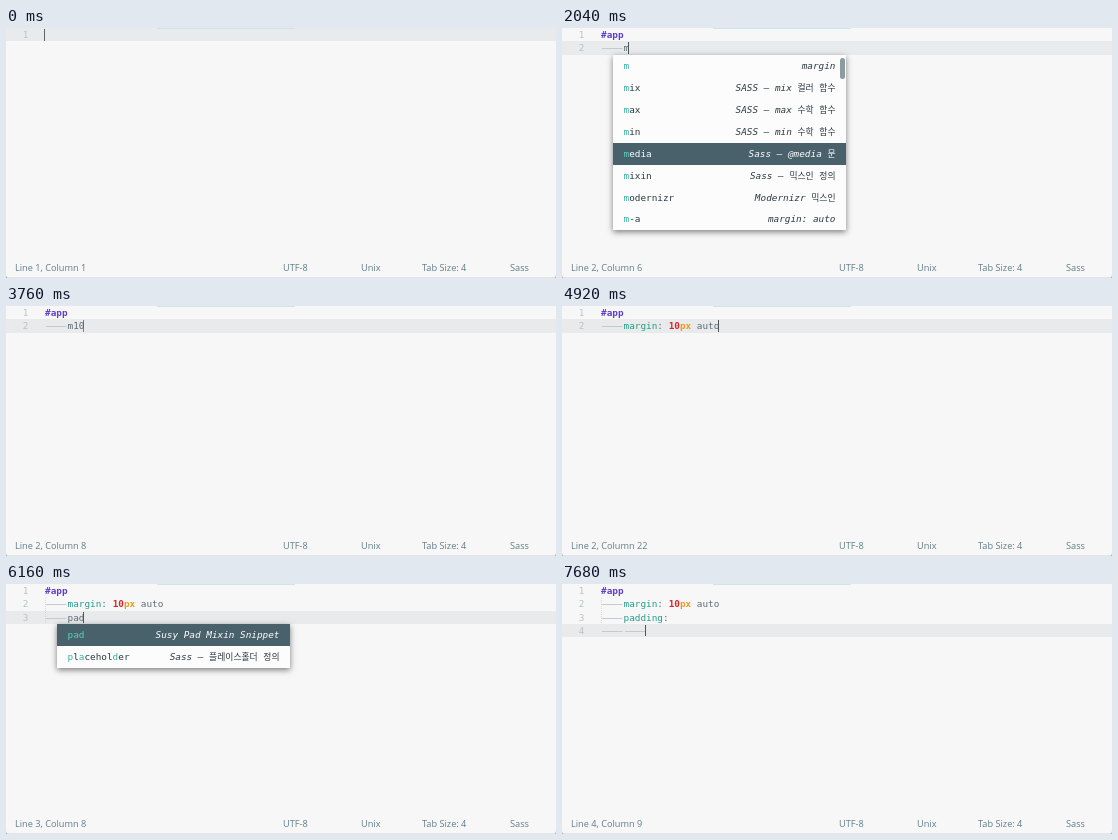
Recreate the animation shown at these times as an HTML page. Size 550 px wide and 250 px high, loop 8 s.

```html
<!DOCTYPE html>
<html lang="en">
<head>
<meta charset="utf-8">
<title>Sass editor</title>
<style>
  html, body { margin: 0; width: 100%; height: 100%; overflow: hidden; background: #9da2a4; }
  #stage {
    position: relative; width: 550px; height: 250px; overflow: hidden;
    background: #f7f7f7; border-radius: 0 0 3px 3px;
    box-shadow: inset 0 -1px #e3e5e6;
    font: 9.37px/13.33px "DejaVu Sans Mono", monospace; color: #5c6c76;
  }
  #stage div { position: absolute; white-space: pre; }
  #active { left: 0; width: 550px; height: 13.33px; background: #e8eaeb; }
  #tabline { left: 151px; top: 0; width: 138px; height: 1px; background: #cbe7e4; }
  #guide { left: 39px; top: 14px; width: 0; height: 25px; border-left: 1px dotted #d0d6d9; }
  #caret { width: 1px; height: 11.5px; background: #4c565b; }
  .num { left: 0; width: 22.5px; text-align: right; color: #bcc3c6; }
  .line { left: 39px; }
  .tab { background: linear-gradient(#c3cbce, #c3cbce) 1px 6px / 20.5px 1px no-repeat; }
  .id { color: #5f3dc9; font-weight: bold; }
  .prop { color: #1f9d89; }
  .val { color: #d5242c; font-weight: bold; }
  .unit { color: #ea9a1e; font-weight: bold; }
  .tag { color: #e2403c; }
  .status { top: 233px; font: 9.2px/13px "Open Sans", sans-serif; color: #5f7d88; }
  #popup {
    left: 51px; width: 233px; background: #fcfcfc; color: #2b3a40;
    box-shadow: 0 2px 6px rgba(0, 0, 0, .5);
  }
  .row { left: 0; width: 233px; height: 21.9px; line-height: 21.9px; }
  .row span { position: absolute; left: 10.5px; }
  .row i { position: absolute; right: 10.5px; }
  .row b { font-weight: normal; color: #35b3a0; }
  .row u {
    font: 8.8px/1 "Noto Sans CJK KR", "Noto Sans CJK", sans-serif; text-decoration: none;
  }
  .row.on { background: #49616b; color: #fff; }
  .row.on b { color: #58d0bd; }
  #bar { left: 227px; top: 3px; width: 5px; height: 21px; border-radius: 3px; background: #8b9ba2; }
</style>
</head>
<body>
<div id="stage">
  <div id="active"></div>
  <div id="tabline"></div>
  <div id="guide"></div>
  <div id="code"></div>
  <div id="caret"></div>
  <div id="pos" class="status" style="left:9px"></div>
  <div class="status" style="left:277px">UTF-8</div>
  <div class="status" style="left:355px">Unix</div>
  <div class="status" style="left:416px">Tab Size: 4</div>
  <div class="status" style="left:504px">Sass</div>
  <div id="popup"><div id="rows"></div><div id="bar"></div></div>
</div>
<script>
const LOOP = 8000, LINE = 13.33, ROW = 21.9, CHAR = 5.641, LEFT = 39;
const $ = id => document.getElementById(id);

const lists = {
  m: { on: 4, rows: [
    ['m', 'margin'], ['mix', 'SASS – mix 컬러 함수'], ['max', 'SASS – max 수학 함수'],
    ['min', 'SASS – min 수학 함수'], ['media', 'Sass – @media 문'],
    ['mixin', 'Sass – 믹스인 정의'], ['modernizr', 'Modernizr 믹스인'], ['m-a', 'margin: auto']] },
  p: { on: 0, rows: [
    ['p', 'padding'],
    ...['po Post', 'pr Pre', 'px Prefix', 'pl Pull', 'ph Push', 'pad Pad'].map(s => {
      const [key, name] = s.split(' ');
      return [key, `Susy ${name} Mixin Snippet`];
    }),
    ['phps', 'PHP 여러줄 입력']] },
  pad: { on: 0, rows: [
    ['pad', 'Susy Pad Mixin Snippet'], ['placeholder', 'Sass – 플레이스홀더 정의']] }
};

// time, finished lines above, current line, completion list
const app = ['#app'];
const margin = [...app, '\tmargin: 10px auto'];
const steps = [
  [0, [], ''], [440, [], '#'], [680, [], '#a'], [800, [], '#ap'], [960, [], '#app'],
  [1200, app, ''], [1360, app, '\t'],
  [1760, app, '\tm', 'm'], [3200, app, '\tm1'], [3320, app, '\tm10'],
  [3960, app, '\tm10-'], [4120, app, '\tm10-a'], [4440, app, margin[1]],
  [5000, margin, '\t'], [5600, margin, '\tp', 'p'],
  [6000, margin, '\tpa', 'pad'], [6160, margin, '\tpad', 'pad'],
  [6520, margin, '\tpadd'], [6640, margin, '\tpaddi'], [6760, margin, '\tpaddin'],
  [6880, margin, '\tpadding'], [7120, margin, '\tpadding:'],
  [7560, [...margin, '\tpadding:'], '\t'], [7680, [...margin, '\tpadding:'], '\t\t']
];

const caretFade = [[0, .9], [60, .8], [120, 0], [439, 0], [440, 1], [2360, 1], [2560, 0],
  [2800, 0], [3000, 1], [3720, 1], [3860, 0], [3959, 0], [3960, 1]];
const popupFade = [[1800, 0], [1960, 1], [3200, 1], [3201, 0], [5640, 0], [5800, 1]];
const barFade = [[2360, 1], [2600, 0], [5599, 0], [5600, 1]];

function lerp(keys, t) {
  const i = keys.findIndex(k => k[0] > t);
  if (i < 0) return keys[keys.length - 1][1];
  if (i === 0) return keys[0][1];
  const [t0, a] = keys[i - 1], [t1, b] = keys[i];
  return a + (b - a) * (t - t0) / (t1 - t0);
}

const span = (cls, text) => `<span class="${cls}">${text}</span>`;

function paint(text) {
  return text
    .replace(/(\d+)(px)/, (_, n, unit) => span('val', n) + span('unit', unit))
    .replace(/(margin|padding)(?=:)/, s => span('prop', s))
    .replace(/^#\w+/, s => span('id', s))
    .replace(/^\tp$/, '\t' + span('tag', 'p'))
    .replace(/\t/g, span('tab', '    '));
}

// Marks the typed letters in order inside a completion.
function mark(word, typed) {
  let i = 0;
  return [...word].map(c => c === typed[i] ? (i++, `<b>${c}</b>`) : c).join('');
}

function showList(key, typed, top) {
  const { on, rows } = lists[key];
  $('popup').style.top = top + 'px';
  $('popup').style.height = rows.length * ROW + 'px';
  $('bar').style.display = rows.length > 2 ? '' : 'none';
  $('rows').innerHTML = rows.map(([word, hint], i) =>
    `<div class="row${i === on ? ' on' : ''}" style="top:${i * ROW}px">` +
    `<span>${mark(word, typed)}</span><i>${hint.replace(/[가-힣]+/g, '<u>$&</u>')}</i></div>`
  ).join('');
}

function show([, above, text, list]) {
  const n = above.length, y = n * LINE;
  const col = text.replace(/\t/g, '    ').length;
  $('code').innerHTML = [...above, text].map((s, i) =>
    `<div class="num" style="top:${i * LINE}px">${i + 1}</div>` +
    `<div class="line" style="top:${i * LINE}px">${paint(s)}</div>`).join('');
  $('active').style.top = y + 'px';
  $('guide').style.display = n > 1 ? '' : 'none';
  $('caret').style.top = y + 1 + 'px';
  $('caret').style.left = Math.floor(LEFT - .5 + col * CHAR) + 'px';
  $('pos').textContent = `Line ${n + 1}, Column ${col + 1}`;
  $('popup').style.display = list ? '' : 'none';
  if (list) showList(list, text.trim(), y + LINE + .5);
}

// The code layer spans the stage so that its lines share the stage origin.
Object.assign($('code').style, { left: 0, top: 0, width: '550px', height: '230px' });

let current;
const start = performance.now();

function frame() {
  const t = (performance.now() - start) % LOOP;
  const step = steps.filter(s => s[0] <= t).pop();
  if (step !== current) show(current = step);
  $('caret').style.opacity = lerp(caretFade, t);
  $('popup').style.opacity = lerp(popupFade, t);
  $('bar').style.opacity = lerp(barFade, t);
  requestAnimationFrame(frame);
}
frame();
</script>
</body>
</html>
```
